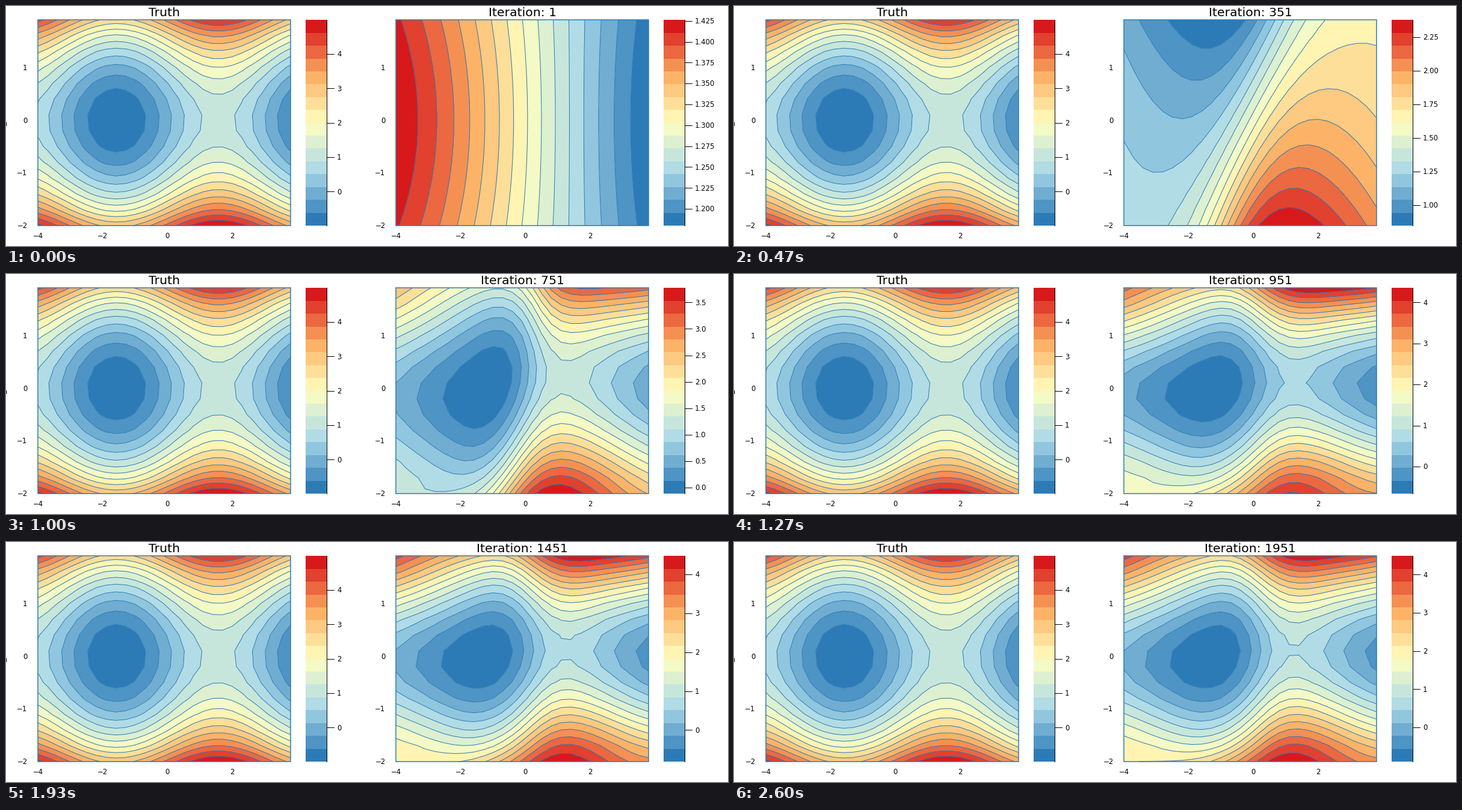
Animation of 1200x400 px, one loop 2670 ms. Source, as a matplotlib script:

```python
import numpy as np
import matplotlib.pyplot as plt
from matplotlib.animation import FuncAnimation
from matplotlib.colors import LinearSegmentedColormap
from matplotlib.patches import Rectangle

LOOP_MS, TICK_MS, FPS = 2670, 10, 15
BANDS = 16
TOP, BOTTOM, WIDTH = 23.3, 366, 420
LEFT_X, RIGHT_X = 53, 648
BLUE = "#2c7bb6"
PT = 0.72  # points per pixel at 100 dpi

cmap = LinearSegmentedColormap.from_list(
    "heat", [BLUE, "#abd9e9", "#ffffbf", "#fdae61", "#d7191c"], N=1024)
COLORS = [cmap(k / (BANDS - 1)) for k in range(BANDS)]

X, Y = np.meshgrid(-4 + 0.3 * np.arange(27), -2 + 0.3 * np.arange(14))

# value range of the learned field at a few steps
STEPS = [0, 7, 11, 19, 25, 33, 39]
LOW = [1.180, 0.846, 0.436, -0.657, -0.744, -0.874, -0.894]
HIGH = [1.426, 2.377, 3.193, 4.350, 4.461, 4.477, 4.486]


def px(x, left):
    return left + (x + 4) * WIDTH / 7.8


def py(y):
    return BOTTOM - (y + 2) * (BOTTOM - TOP) / 3.9


def fit_range(z, step):
    lo, hi = np.interp(step, STEPS, LOW), np.interp(step, STEPS, HIGH)
    return lo + (hi - lo) * (z - z.min()) / (z.max() - z.min())


def first_guess():
    q = Y ** 2 / 4
    t = ((px(X, RIGHT_X) + 113.4 * q) / (1 + 0.12 * q) - 867) / 185
    return 8 - 7.94 * t - 0.19 * t ** 2 + 0.722 * t ** 3


def cliff(left, left_slope, right, right_slope, centre, rate):
    """Two ramps joined by a tanh step; each argument is a polynomial in y."""
    a, sa, b, sb, c, r = (np.polyval(p, Y) for p in (
        left, left_slope, right, right_slope, centre, rate))
    low = a + sa * (X + 4)
    high = b + sb * (X - 3.8)
    return low + (high - low) * (1 + np.tanh(r * (X - c))) / 2


def late(step):
    """Warped sine valley plus a quartic in y; the misfit decays with the step."""
    miss = np.exp((19 - step) / 7.5)
    phase = 1.9 + 0.5 * (X - 0.3) + 1.5 * np.tanh((X - 0.3) / 1.7)
    g = np.exp(-((X + 1) / 2) ** 2)
    d1 = -0.04 - 0.29 * np.tanh(X + 1.1) + 0.125 * (1 + np.tanh(X - 3))
    d3 = 0.06 - 0.05 * np.cos(0.75 * (X + 1.8))
    c2 = 1.41 - 0.45 * g
    c4 = -0.13 + 0.12 * g + 0.008 * X
    z = -0.06 - 0.84 * np.cos(phase) + d1 * Y + c2 * Y ** 2 + d3 * Y ** 3 + c4 * Y ** 4
    w = Y / 2
    drift = (0.06 + 0.175 * np.cos(phase) + w ** 2 * (0.24 * np.tanh(X) - 0.31)
             + w ** 3 * (0.12 + 0.02 * X))
    return z + miss * drift


STAGES = [fit_range(z, s) for s, z in zip(STEPS, (
    first_guess(),
    cliff([-0.1, -0.45, 3.95], [-0.25, -0.7], [0.15, -0.9, 10.1],
          [0.4, -0.8], [0.28, -0.1], [0.74]),
    cliff([-0.2, 0.85, 4.6], [-0.2, -1.2], [0.85, 0.35, 5.2],
          [0.7, -1.45], [0.24, -0.02], [0.14, 1.4]),
    late(19)))]


def learned(step):
    if step >= 19:
        return fit_range(late(step), step)
    k = np.searchsorted(STEPS, step, "right") - 1
    s = (step - STEPS[k]) / (STEPS[k + 1] - STEPS[k])
    return fit_range((1 - s) * STAGES[k] + s * STAGES[k + 1], step)


fig = plt.figure(figsize=(12, 4), dpi=100, facecolor="white")
ax = fig.add_axes([0, 0, 1, 1])


def label(x, y, s, size=11.66, ha="center"):
    return ax.text(x, y, s.replace("-", "\u2212"), fontsize=size * PT, ha=ha,
                   va="baseline", family="DejaVu Sans", color="black")


def contours(z, left):
    levels = np.linspace(z.min(), z.max(), BANDS + 1)
    inner = levels[1:-1].copy()
    levels[0] -= 1e-9
    levels[-1] += 1e-9
    gx, gy = px(X, left), py(Y)
    return [ax.contourf(gx, gy, z, levels=levels, colors=COLORS, zorder=1),
            ax.contour(gx, gy, z, levels=inner, colors=BLUE, linewidths=PT,
                       linestyles="solid", zorder=2)]


def bar_ticks(z, x):
    lo, hi = z.min(), z.max()
    n = np.floor(np.log10(hi - lo))
    f = (hi - lo) / 10 ** n
    step = (1 if f > 5 else 0.5 if f > 2.5 else 0.25 if f > 1 else 0.1) * 10 ** n
    digits = next(d for d in range(6) if abs(round(step, d) - step) < 1e-9)
    out = []
    for k in range(int(np.ceil(lo / step)), int(np.floor(hi / step)) + 1):
        y = BOTTOM - (k * step - lo) / (hi - lo) * (BOTTOM - TOP)
        out += ax.plot([x, x + 12], [y, y], color="black", lw=PT)
        out.append(label(x + 17, y + 4.25, f"{k * step:.{digits}f}", ha="left"))
    return out


def panel(left):
    ax.add_patch(Rectangle((left, TOP), WIDTH, BOTTOM - TOP, fill=False,
                           ec=BLUE, lw=1.5 * PT, zorder=3))
    for v in (-4, -2, 0, 2):
        label(px(v, left), 387, str(v))
    for v in (-2, -1, 0, 1):
        label(left - 17.5, py(v) + 4.25, str(v), ha="right")
    bar, h = left + 444.5, (BOTTOM - TOP) / BANDS
    for k, c in enumerate(COLORS):
        ax.add_patch(Rectangle((bar, BOTTOM - (k + 1) * h), 35.5, h, fc=c, lw=0))
    ax.plot([bar + 35.5] * 2, [TOP, BOTTOM], color="black", lw=PT)
    return label(left + WIDTH / 2, 17.4, "", 20.4)


truth = np.sin(X) + Y ** 2
panel(LEFT_X).set_text("Truth")
title = panel(RIGHT_X)
contours(truth, LEFT_X)
bar_ticks(truth, LEFT_X + 480)
ax.plot([0.4, 0.4], [194, 198.5], color="black", lw=PT)  # clipped axis name
ax.set(xlim=(0, 1200), ylim=(400, 0))
ax.axis("off")

live = []
shown = None


def draw(tick):
    global shown
    # 15 steps a second, each start rounded to 10 ms
    step = int((tick * TICK_MS + TICK_MS / 2) * FPS / 1000)
    if step == shown:
        return []
    shown = step
    while live:
        live.pop().remove()
    z = learned(step)
    live.extend(contours(z, RIGHT_X))
    live.extend(bar_ticks(z, RIGHT_X + 480))
    title.set_text(f"Iteration: {1 + 50 * step}")
    ax.set(xlim=(0, 1200), ylim=(400, 0))
    return []


anim = FuncAnimation(fig, draw, frames=LOOP_MS // TICK_MS, init_func=lambda: draw(0),
                     interval=TICK_MS, repeat=True, repeat_delay=0)
plt.show()
```
